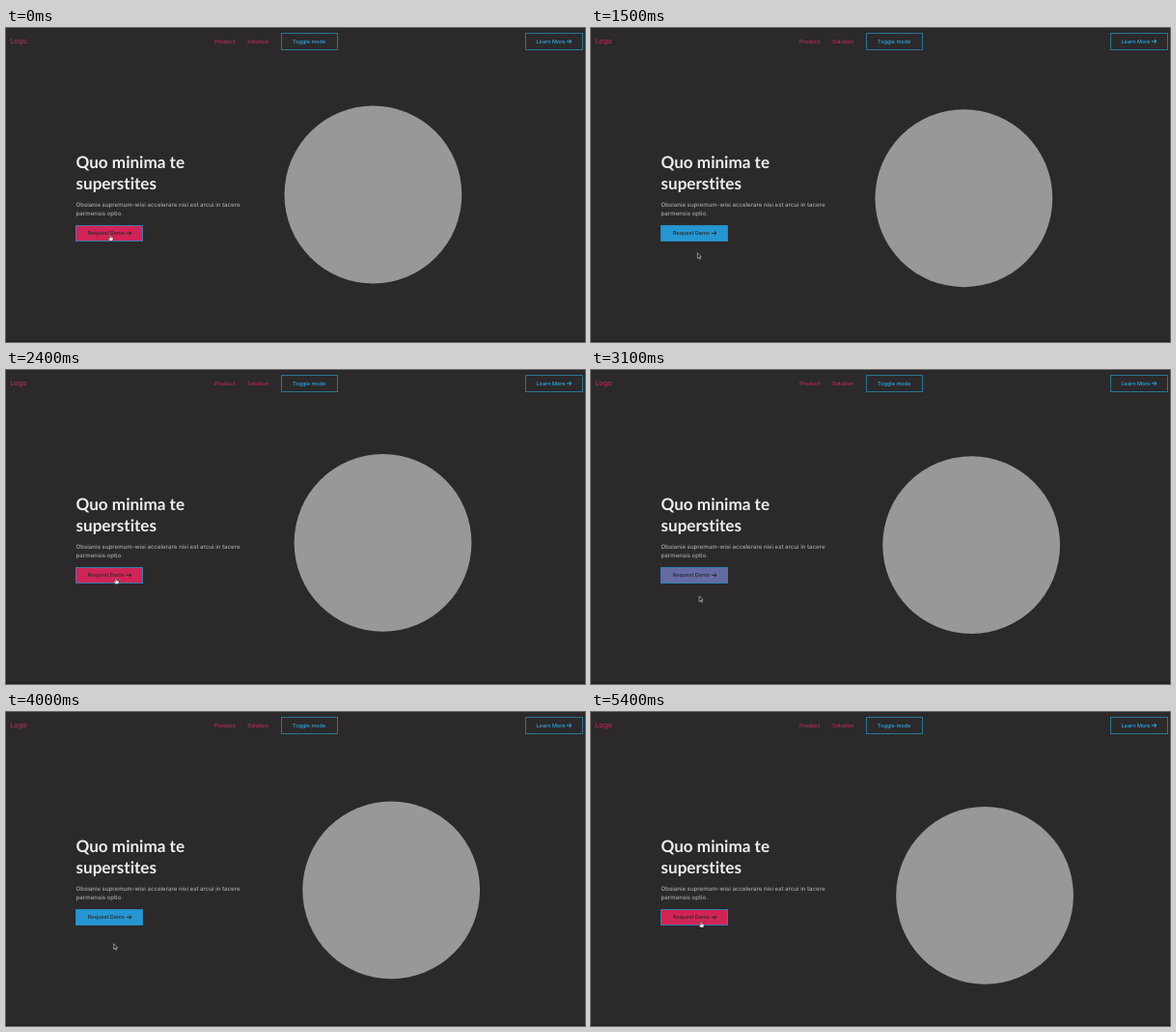
These frames come from a looping animation (600 px wide and 325 px high, 5500 ms). An HTML page:

```html
<!DOCTYPE html>
<html lang="en">
<head>
<meta charset="utf-8">
<title>Landing page hover</title>
<style>
  html, body { margin: 0; width: 100%; height: 100%; overflow: hidden; background: #2b292a; }
  svg { display: block; width: 600px; height: 325px; }
  text { font: 500 5.5px Inter, Roboto, sans-serif; text-rendering: geometricPrecision; }
  .logo { font-size: 7.4px; font-weight: 400; fill: #c22a57; }
  .link { font-size: 5.7px; fill: #c02b57; }
  .title { font: 700 17.1px Lato, "Open Sans", sans-serif; font-variant-ligatures: none; fill: #efeeee; }
  .body { font-size: 6.1px; fill: #a9a7a8; }
  .ghost rect { fill: none; stroke: #2a7595; }
  .ghost text { fill: #2cabe8; }
  .arrow { fill: none; stroke-width: 1; }
</style>
</head>
<body>
<svg viewBox="0 0 600 325">
  <defs>
    <path id="arrow" d="M0 0H5M2.8 -2.1L5 0L2.8 2.1"/>
  </defs>
  <rect width="600" height="325" fill="#2b292a"/>
  <rect y="323.5" width="600" height="1.5" fill="#232122"/>

  <text class="logo" x="4.2" y="16.4">Logo</text>
  <text class="link" x="216" y="15.8">Product</text>
  <text class="link" x="250" y="15.8">Solution</text>
  <g class="ghost">
    <rect x="285.5" y="5.5" width="58" height="17"/>
    <text x="297" y="15.8">Toggle mode</text>
    <rect x="538.5" y="5.5" width="59" height="17"/>
    <text x="549.5" y="15.8">Learn More</text>
    <use class="arrow" href="#arrow" x="581" y="13.9" stroke="#2cabe8"/>
  </g>

  <text class="title" x="72.5" y="145.2">Quo minima te</text>
  <text class="title" x="72.5" y="167.2">superstites</text>
  <text class="body" x="72.5" y="184.5">Obsianie supremum-wisi accelerare nisi est arcui in tacere</text>
  <text class="body" x="72.5" y="194.4">parmensis optio.</text>

  <circle id="disc" r="91.9" fill="#999798"/>

  <rect id="button" x="72.5" y="204.5" width="69" height="16" stroke="#2796cf" stroke-opacity=".75"/>
  <text x="84.8" y="214.3" fill="#2b292a">Request Demo</text>
  <use class="arrow" href="#arrow" x="125" y="212.4" stroke="#2b292a"/>

  <path id="pointer" d="M0 0V5.6L1.3 4.5L2.2 6.5L3.1 6.1L2.2 4.1H3.9Z" fill="#111" stroke="#ddd" stroke-width=".6"/>
  <path id="hand" d="M-.6 .4Q0 -.4 .6 .4V2.3L2.6 2.8Q3.2 3 3 4L2.5 6H-.6L-2.2 3.8Q-2.2 3 -1.4 3.3L-.6 4Z" fill="#f4f4f4" stroke="#222" stroke-width=".4"/>
</svg>
<script>
  const LOOP = 5.5, STEP = 0.1, FADE = 0.32;
  const PINK = [209, 36, 86], BLUE = [37, 150, 209];

  // the cursor leaves the button twice
  const trips = [
    { out: 0.9, back: 1.9, depth: 18 },
    { out: 2.9, back: 4.5, depth: 25 }
  ];

  const $ = id => document.getElementById(id);
  const clamp = v => Math.min(1, Math.max(0, v));
  const sum = f => trips.reduce((total, trip) => total + f(trip), 0);

  function draw(t) {
    const drift = 3.5 * t + 0.3 * t * t;
    $('disc').setAttribute('cx', 380.4 + drift);
    $('disc').setAttribute('cy', 172.5 + drift * 0.63);

    const blue = sum(({ out, back }) => clamp((t - out) / FADE) - clamp((t - back) / FADE));
    const rgb = PINK.map((c, i) => Math.round(c + (BLUE[i] - c) * blue));
    $('button').setAttribute('fill', `rgb(${rgb})`);

    const dip = sum(({ out, back, depth }) =>
      depth * Math.cbrt(Math.sin(Math.PI * clamp((t - out) / (back - out)))));
    const x = 108 + 6 * clamp(t / 2.2) - 0.1 * dip;
    const y = 214.3 + 0.5 * t + dip;
    const away = dip > 0.1;
    for (const [id, on] of [['hand', !away], ['pointer', away]]) {
      $(id).setAttribute('transform', `translate(${x} ${y})`);
      $(id).setAttribute('visibility', on ? 'visible' : 'hidden');
    }
  }

  const start = performance.now();
  function tick() {
    const t = (performance.now() - start) / 1000 % LOOP;
    draw(Math.floor(t / STEP) * STEP);
    requestAnimationFrame(tick);
  }
  tick();
</script>
</body>
</html>
```
